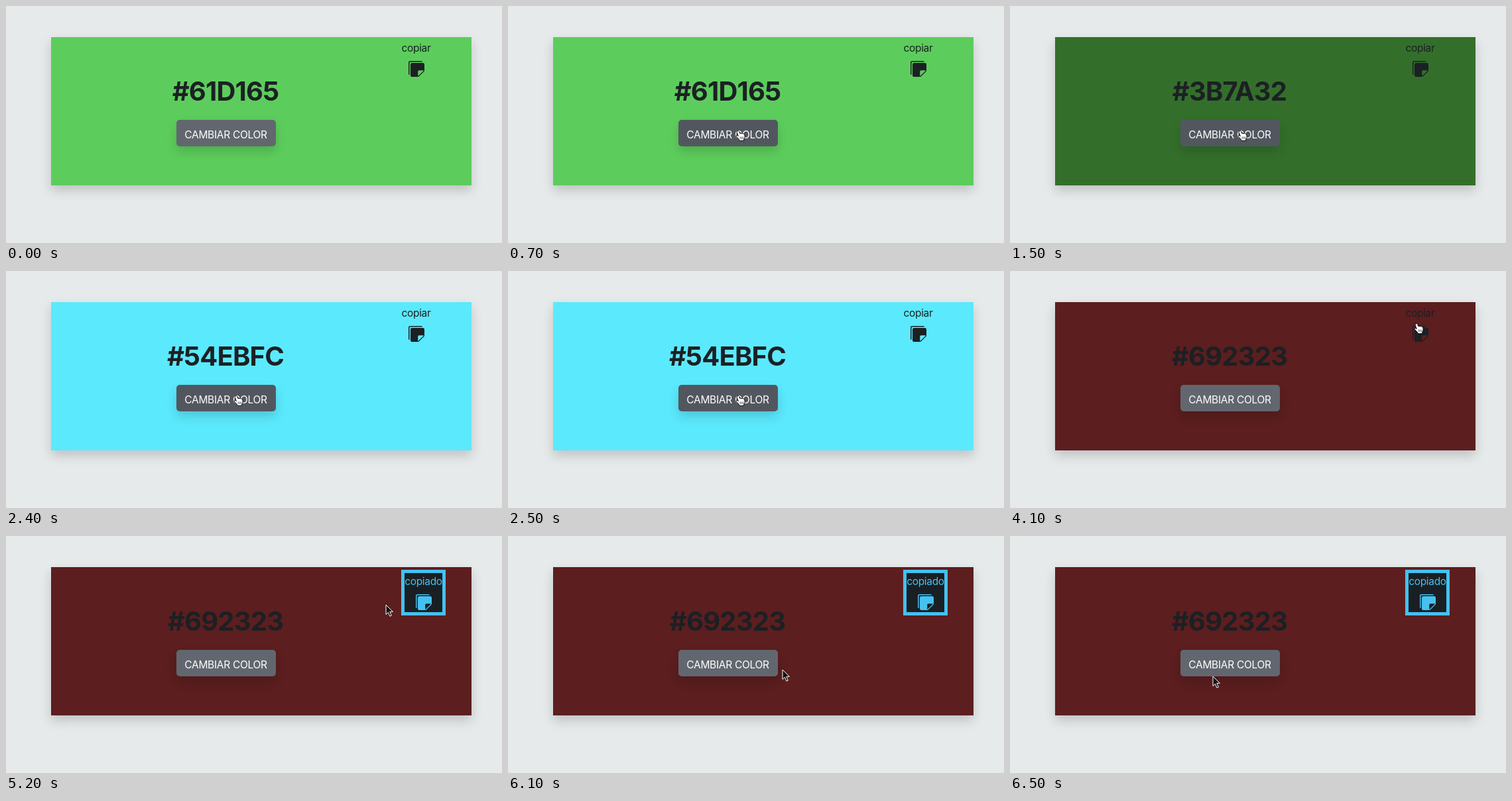
An HTML page for the animation above (6800 ms loop, 748 by 358 pixels).

```html
<!DOCTYPE html>
<html lang="es">
<head>
<meta charset="utf-8">
<title>Cambiar color</title>
<style>
  html, body { margin: 0; width: 100%; height: 100%; overflow: hidden; background: #e6eaea; }
  div, svg { position: absolute; box-sizing: border-box; }
  #stage { left: 0; top: 0; width: 748px; height: 358px; overflow: hidden; }
  #card { left: 67.5px; top: 47px; width: 634.5px; height: 224px; box-shadow: 0 8px 16px rgba(0, 0, 0, .17); }
  #button { left: 256.5px; top: 172px; width: 150.5px; height: 40px; border-radius: 5px; box-shadow: 0 8px 16px rgba(0, 0, 0, .15); }
  #copied { left: 596px; top: 51px; width: 67px; height: 69px; border: 5px solid #45c1f0; background: #1a1f23; }
  #art { left: 0; top: 0; }
  text { font: 15.5px Inter, sans-serif; letter-spacing: -.02em; text-anchor: middle; fill: #1c2024; }
  #code { font-size: 40px; font-weight: 700; }
</style>
</head>
<body>
<div id="stage">
  <div id="card"></div>
  <div id="button"></div>
  <div id="copied"></div>
  <svg id="art" width="748" height="358">
    <text id="code" x="331" y="142.5"></text>
    <text x="331.5" y="199.5" style="fill:#fff">CAMBIAR COLOR</text>
    <text id="label"></text>
    <g id="icon">
      <path d="M0 1.5V13a1 1 0 0 0 1 1V1.5a.5.5 0 0 1 .5-.5H14a1 1 0 0 0-1-1H1.5A1.5 1.5 0 0 0 0 1.5z"/>
      <path d="M3.5 2A1.5 1.5 0 0 0 2 3.5v11A1.5 1.5 0 0 0 3.5 16h6.086a1.5 1.5 0 0 0 1.06-.44l4.915-4.914A1.5 1.5 0 0 0 16 9.586V3.5A1.5 1.5 0 0 0 14.5 2zm6 8.5a1 1 0 0 1 1-1h4.396a.25.25 0 0 1 .177.427l-5.146 5.146a.25.25 0 0 1-.427-.177z"/>
    </g>
    <path id="arrow" d="M0 0V14.5L3.4 11.4 5.9 17.2 8.4 16.1 5.9 10.4H10.4Z" fill="#111" stroke="#fff" stroke-linejoin="round"/>
    <g id="hand" stroke="#111" stroke-linejoin="round" stroke-linecap="round">
      <path d="M-4-7.2q1.6-1.3 2.6.8l1.2 3q1.2-1 2.2.1 1.2-1 2.3.3 1.6-.8 2.2 1l.6 2.6q.3 3-1.4 4.4v2.5h-6.5l-.6-1.8-4.4-4.6q-.6-1.8 1.2-1.8l1.9 1.2-2.2-6q-.3-1.2.9-1.7z" fill="#fff"/>
      <path d="M.2 1.8v2.6M2.3 1.8v2.6M4.3 1.8v2.6" stroke-width=".7" fill="none"/>
    </g>
  </svg>
</div>
<script>
const LOOP = 6800;

// start time, hex label, displayed colour
const palette = [
  [0, '#61D165', '#5ccd5c'],
  [1500, '#3B7A32', '#336f2b'],
  [2400, '#54EBFC', '#5be9fd'],
  [3400, '#692323', '#5c1e1f']
];

// start time, pointer shape, x, y
const pointer = [
  [0, ''],
  [500, 'arrow', 484, 264],
  [600, 'hand', 388, 203],
  [700, 'hand', 350, 196],
  [3600, 'hand', 390, 181],
  [3700, 'arrow', 462, 148],
  [3800, 'arrow', 528, 118],
  [3900, 'arrow', 574, 100],
  [4000, 'hand', 607, 90],
  [4100, 'hand', 616, 87],
  [5200, 'arrow', 573, 104],
  [5300, 'arrow', 488, 166],
  [5400, 'arrow', 434, 201],
  [6100, 'arrow', 414, 202],
  [6200, 'hand', 384, 203],
  [6300, 'hand', 350, 203],
  [6400, 'hand', 322, 205],
  [6500, 'arrow', 306, 212]
];

const $ = id => document.getElementById(id);
const at = (steps, t) => steps.findLast(([start]) => start <= t);

function draw(t) {
  const [, hex, color] = at(palette, t);
  $('code').textContent = hex;
  $('card').style.background = color;

  const [, shape, x, y] = at(pointer, t);
  for (const id of ['arrow', 'hand']) {
    $(id).style.display = id === shape ? '' : 'none';
    if (id === shape) $(id).setAttribute('transform', `translate(${x} ${y})`);
  }
  const hover = shape === 'hand' && x < 407;
  $('button').style.background = hover ? '#52575f' : '#62676f';

  const copied = t >= 4500;
  const ink = copied ? '#45c1f0' : '#1c2024';
  $('copied').style.display = copied ? '' : 'none';
  $('label').textContent = copied ? 'copiado' : 'copiar';
  $('label').setAttribute('x', copied ? 629.5 : 618.5);
  $('label').setAttribute('y', copied ? 73.5 : 68.5);
  $('label').style.fill = ink;
  $('icon').setAttribute('fill', ink);
  $('icon').setAttribute('transform', `translate(${copied ? '618 88' : '607 83'}) scale(1.5)`);
}

const begin = performance.now();
function frame() {
  draw((performance.now() - begin) % LOOP);
  requestAnimationFrame(frame);
}
frame();
</script>
</body>
</html>
```
